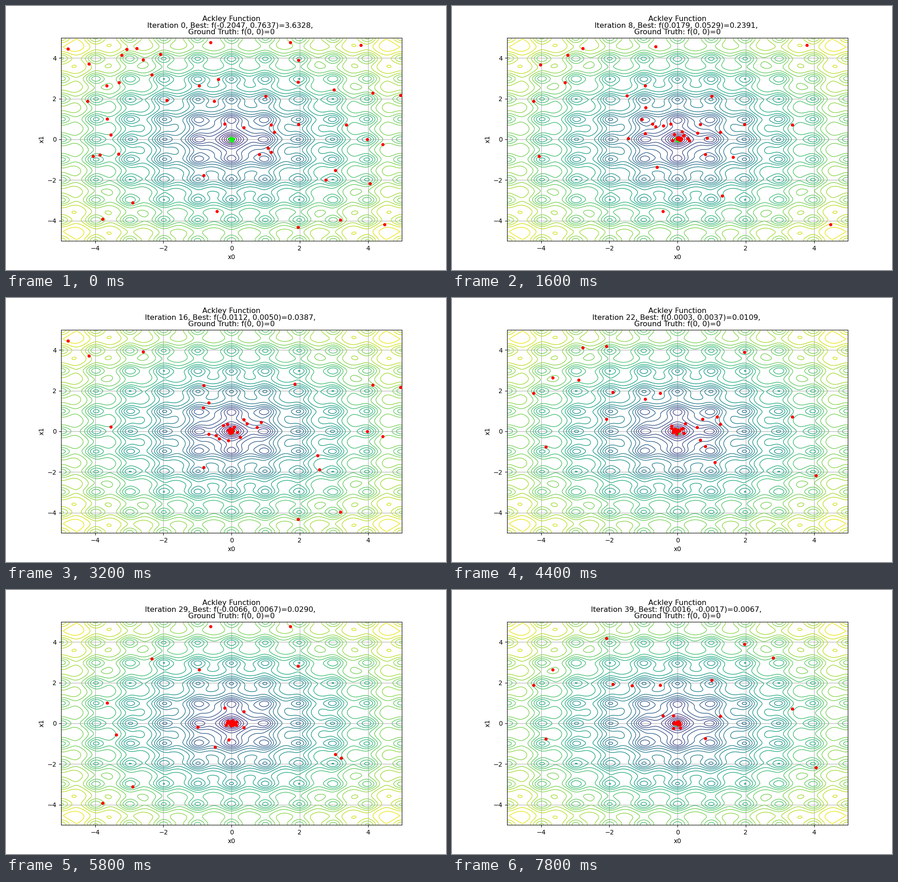
These frames come from a looping animation (966x580 px, 8000 ms). A matplotlib script:

```python
import numpy as np
import matplotlib.pyplot as plt
from matplotlib.animation import FuncAnimation

STEPS = 40
POP = 50
LIMIT = 5

# scouts that hold well-spread starting places; the rest start at random
SCOUTS = [(-0.62, 4.76), (1.72, 4.76), (-3.22, 4.15), (-2.34, 3.18),
          (1.16, 0.71), (1.26, 0.36), (1.96, 0.73), (3.36, 0.71),
          (4.95, 2.18), (0.82, -0.74), (-4.06, -0.83), (-3.86, -0.76),
          (-3.31, -0.72), (3.04, -1.52), (2.77, -1.99), (-0.43, -3.53)]

# best place found so far at a few iterations
BEST_STEPS = [0, 8, 16, 22, 29, 33, 39]
BEST_X = [-0.2047, 0.0179, -0.0112, 0.0003, -0.0066, 0.0006, 0.0016]
BEST_Y = [0.7637, 0.0529, 0.0050, 0.0037, 0.0067, 0.0065, -0.0017]


def ackley(x, y):
    bowl = -20 * np.exp(-0.2 * np.sqrt(0.5 * (x**2 + y**2)))
    waves = -np.exp(0.5 * (np.cos(2 * np.pi * x) + np.cos(2 * np.pi * y)))
    return bowl + waves + np.e + 20


def best_at(step):
    return np.array([np.interp(step, BEST_STEPS, BEST_X),
                     np.interp(step, BEST_STEPS, BEST_Y)])


seed = np.random.default_rng(12)
homes = seed.uniform(-LIMIT, LIMIT, (POP, 2))
homes[0] = best_at(0)
homes[1:len(SCOUTS) + 1] = SCOUTS
order = seed.permutation(POP)


def swarm(step):
    """Some members sit at home, the others are pulled ever closer to the best."""
    if step == 0:
        return homes
    rng = np.random.default_rng(step)
    pull = rng.random((POP, 1)) ** (1 + step / 4)
    pts = best_at(step) + homes * pull + rng.normal(0, 0.05, (POP, 2))
    at_home = round(POP * (0.24 + 0.76 * np.exp(-step / 3)))
    # the group at home changes little by little
    stay = np.roll(order, -3 * step)[:at_home]
    pts[stay] = homes[stay]
    pts[-1] = best_at(step)
    return pts


fig, ax = plt.subplots(figsize=(9.66, 5.80), dpi=100)
grid = np.linspace(-LIMIT, LIMIT, 200)
X, Y = np.meshgrid(grid, grid)
ax.contour(X, Y, ackley(X, Y), levels=np.arange(0, 14.6, 0.5),
           cmap="viridis", linewidths=1.0)
ax.plot(0, 0, "*", color="lime", markersize=12, zorder=3)
dots, = ax.plot([], [], "r.", markersize=8, zorder=4)
ax.set(xlim=(-LIMIT, LIMIT), ylim=(-LIMIT, LIMIT), xlabel="x0", ylabel="x1")
ax.grid(True)
title = ax.set_title("", fontsize=11.7, linespacing=0.97, pad=5.5)


def draw(step):
    dots.set_data(*swarm(step).T)
    x, y = best_at(step)
    title.set_text("Ackley Function\n"
                   f"Iteration {step}, Best: f({x:.4f}, {y:.4f})={ackley(x, y):.4f}, \n"
                   "Ground Truth: f(0, 0)=0")
    return dots, title


anim = FuncAnimation(fig, draw, frames=STEPS, interval=200, repeat=True,
                     repeat_delay=0, init_func=lambda: draw(0))
plt.show()
```
